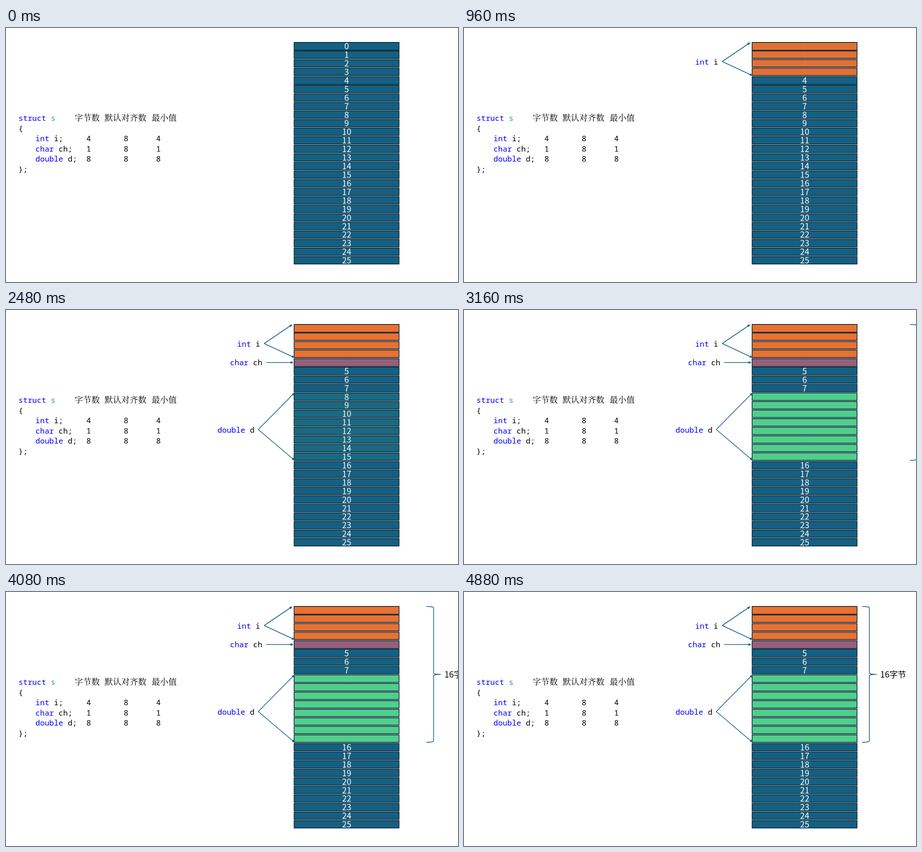
Write an HTML page that moves like this. It is 998 px wide and 561 px high and loops after 4920 ms.

```html
<!DOCTYPE html>
<html lang="zh-CN">
<head>
<meta charset="utf-8">
<title>Struct alignment</title>
<style>
  html, body { margin: 0; width: 100%; height: 100%; overflow: hidden; background: #fff; }
  svg { display: block; width: 998px; height: 561px; }
  text { white-space: pre; }

  .code { font: 17px "Noto Sans Mono", "DejaVu Sans Mono", monospace; }
  .mid, .cell text { text-anchor: middle; }
  .kw { fill: #00f; }
  .type { fill: #2b91af; }
  .head { font: 300 18.5px "Noto Serif CJK SC", "Noto Sans CJK SC", serif; }
  .sans { font: 300 18.4px "Noto Sans CJK SC", "Noto Sans CJK JP", sans-serif; }

  .cell rect { fill: #156082; stroke: #042433; stroke-width: 1.6; }
  .cell text { fill: #fff; }
  .line { fill: none; stroke: #156082; stroke-width: 1.56; }

  /* Six steps of 488 ms, then a 1952 ms slide, in a 4920 ms loop */
  .anim, .i *, .ch *, .d * { animation: 4920ms linear infinite; }
  .i  { --to: #e97132; }
  .ch { --to: #965f7a; }
  .d  { --to: #50ce8c; }
  .i rect  { animation-name: cell-i; }
  .ch rect { animation-name: cell-ch; }
  .d rect  { animation-name: cell-d; }
  .i text  { animation-name: num-i; }
  .ch text { animation-name: num-ch; }
  .d text  { animation-name: num-d; }
  #label-i  { animation-name: show-i; }
  #label-ch { animation-name: show-ch; }
  #label-d  { animation-name: show-d; }
  #total    { animation-name: slide; }

  @keyframes show-i  { 0% { opacity: 0; } 9.919%, 100% { opacity: 1; } }
  @keyframes show-ch { 0%, 19.837% { opacity: 0; } 29.756%, 100% { opacity: 1; } }
  @keyframes show-d  { 0%, 39.675% { opacity: 0; } 49.593%, 100% { opacity: 1; } }

  @keyframes cell-i  { 0%, 9.919% { fill: #156082; } 19.837%, 100% { fill: var(--to); } }
  @keyframes cell-ch { 0%, 29.756% { fill: #156082; } 39.675%, 100% { fill: var(--to); } }
  @keyframes cell-d  { 0%, 49.593% { fill: #156082; } 59.512%, 100% { fill: var(--to); } }
  @keyframes num-i   { 0%, 9.919% { fill: #fff; } 19.837%, 100% { fill: var(--to); } }
  @keyframes num-ch  { 0%, 29.756% { fill: #fff; } 39.675%, 100% { fill: var(--to); } }
  @keyframes num-d   { 0%, 49.593% { fill: #fff; } 59.512%, 100% { fill: var(--to); } }

  @keyframes slide {
    0%, 59.512% { transform: translateX(120px); }
    99.187%, 100% { transform: translateX(0); }
  }
</style>
</head>
<body>
<svg viewBox="0 0 998 561">
  <defs>
    <marker id="tip" markerUnits="userSpaceOnUse" markerWidth="6" markerHeight="6"
            refX="5.6" refY="3" orient="auto">
      <path d="M0 0L6 3L0 6Z" fill="#156082"/>
    </marker>
  </defs>

  <g class="code">
    <text x="27.5" y="205"><tspan class="kw">struct</tspan> <tspan class="type">s</tspan></text>
    <text x="27.5" y="227.5">{</text>
    <text x="65" y="250"><tspan class="kw">int</tspan> i;</text>
    <text x="65" y="272.5"><tspan class="kw">char</tspan> ch;</text>
    <text x="65" y="295"><tspan class="kw">double</tspan> d;</text>
    <text x="27.5" y="317.5">};</text>
  </g>
  <g class="head">
    <text x="151.5" y="205">字节数</text>
    <text x="217.5" y="205">默认对齐数</text>
    <text x="321.5" y="205">最小值</text>
  </g>
  <g id="sizes" class="code mid"></g>

  <g id="memory" class="sans"></g>

  <g id="label-i" class="anim">
    <text class="code" x="510.3" y="80.5"><tspan class="kw">int</tspan> i</text>
    <path class="line" marker-end="url(#tip)" d="M570 74L631.5 32.5"/>
    <path class="line" marker-end="url(#tip)" d="M570 74L636.5 105"/>
  </g>
  <g id="label-ch" class="anim">
    <text class="code" x="494.5" y="122"><tspan class="kw">char</tspan> ch</text>
    <path class="line" marker-end="url(#tip)" d="M574.5 116H634"/>
  </g>
  <g id="label-d" class="anim">
    <text class="code" x="467" y="270.5"><tspan class="kw">double</tspan> d</text>
    <path class="line" marker-end="url(#tip)" d="M557 264L636.5 183.5"/>
    <path class="line" marker-end="url(#tip)" d="M557 264L636.5 331.5"/>
  </g>

  <g id="total" class="anim">
    <path class="line" d="M879 32A16 2.7 0 0 1 895 34.7V179.3A16 2.7 0 0 0 911 182A16 2.7 0 0 0 895 184.7V329.3A16 2.7 0 0 1 879 332"/>
    <text class="sans" x="919" y="188.7">16字节</text>
  </g>
</svg>
<script>
  const NS = 'http://www.w3.org/2000/svg';

  function add(parent, tag, attrs, text = '') {
    const el = document.createElementNS(NS, tag);
    for (const key in attrs) el.setAttribute(key, attrs[key]);
    el.textContent = text;
    return parent.appendChild(el);
  }

  const sizes = document.getElementById('sizes');
  [[4, 8, 4], [1, 8, 1], [8, 8, 8]].forEach((row, r) =>
    row.forEach((n, c) =>
      add(sizes, 'text', { x: [182.7, 265, 336.7][c], y: 250 + r * 22.5 }, n)));

  // Which member owns a byte of the struct
  const owner = n => n < 4 ? 'i' : n === 4 ? 'ch' : n > 7 && n < 16 ? 'd' : '';

  const memory = document.getElementById('memory');
  for (let n = 0; n < 26; n++) {
    const y = 31.8 + n * 18.92;
    const cell = add(memory, 'g', { class: 'cell ' + owner(n) });
    const height = n === 0 || n === 4 ? 17.3 : 16.5;
    add(cell, 'rect', { x: 636.2, y, width: 231.6, height });
    add(cell, 'text', { x: 752.2, y: y + 15.4 }, n);
  }
</script>
</body>
</html>
```
